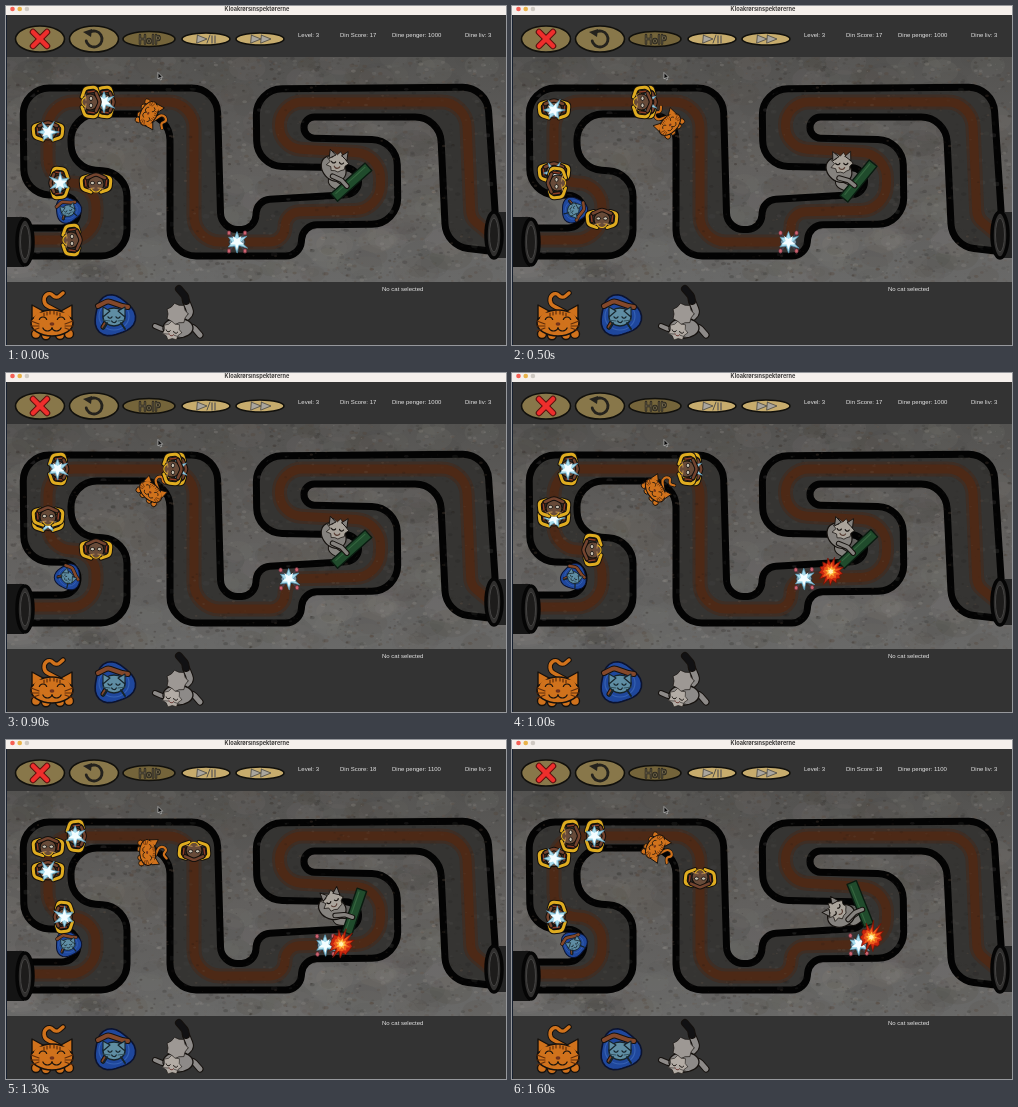
Animation, 500 px wide and 339 px high, one loop 1.7 s. Source, as an HTML page with a canvas:

```html
<!DOCTYPE html>
<html lang="da">
<head>
<meta charset="utf-8">
<title>Kloakrørsinspektørerne</title>
<style>
  html, body { margin: 0; width: 500px; height: 339px; overflow: hidden; background: #333; }
  canvas, svg { position: absolute; left: 0; top: 0; display: block; }
  text { font: 6px "Liberation Sans", Arial, sans-serif; fill: #e4e4e4; }
  .title { font: bold 5.6px Inter, "Liberation Sans", sans-serif; fill: #3b3938; text-anchor: middle; }
</style>
</head>
<body>
<canvas id="stage" width="500" height="339"></canvas>
<svg width="500" height="339">
  <text class="title" x="251" y="5">Kloakrørsinspektørerne</text>
  <text x="292" y="31">Level: 3</text>
  <text x="334" y="31" id="score"></text>
  <text x="386" y="31" id="money"></text>
  <text x="459" y="31">Dine liv: 3</text>
  <text x="376" y="285">No cat selected</text>
</svg>
<script>
const LOOP = 1700, STEP = 100, KILL = 1100, FIRE = 1000;
const FAST = 0.091, SLOW = 0.044; // px per ms
const INK = '#15110e';
const scoreText = document.getElementById('score');
const moneyText = document.getElementById('money');
const front = document.getElementById('stage').getContext('2d');
let c = front;

let seed = 7;
const rnd = () => (seed = (seed * 16807) % 2147483647) / 2147483647;
const pick = list => list[Math.floor(rnd() * list.length)];

// ---------- drawing helpers ----------
function paint(fill, line, width = 1) {
  if (fill) { c.fillStyle = fill; c.fill(); }
  if (line) { c.strokeStyle = line; c.lineWidth = width; c.stroke(); }
}
function oval(x, y, rx, ry, fill, line, width) {
  c.beginPath();
  c.ellipse(x, y, rx, ry, 0, 0, Math.PI * 2);
  paint(fill, line, width);
}
function box(x, y, w, h, fill) {
  c.fillStyle = fill;
  c.fillRect(x, y, w, h);
}
function poly(points, fill, line, width) {
  c.beginPath();
  for (const [x, y] of points) c.lineTo(x, y);
  c.closePath();
  paint(fill, line, width);
}
// Polyline with rounded corners
function bend(points, radius) {
  const gap = (a, b) => Math.hypot(a[0] - b[0], a[1] - b[1]);
  c.beginPath();
  points.forEach((p, i) => {
    const a = points[i - 1], b = points[i + 1];
    if (a && b) c.arcTo(...p, ...b, Math.min(radius, gap(a, p) / 2, gap(p, b) / 2));
    else c.lineTo(...p);
  });
}
function limb(points, color, width) {
  bend(points, width * 2);
  paint(null, INK, width + 2);
  paint(null, color, width);
}
function stroke(x1, y1, x2, y2, color, width) {
  c.beginPath();
  c.moveTo(x1, y1);
  c.lineTo(x2, y2);
  paint(null, color, width);
}
function smile(x, y, r, color = INK, up = 1) {
  c.beginPath();
  c.arc(x, y, r, 0.4, Math.PI - 0.4);
  if (up < 0) { c.beginPath(); c.arc(x, y, r, Math.PI + 0.4, -0.4); }
  paint(null, color, 1.2);
}
function ring(n, radius) {
  return Array.from({ length: n }, (_, i) => {
    const a = i * Math.PI * 2 / n, r = radius(i);
    return [r * Math.cos(a), r * Math.sin(a)];
  });
}
function burst(n, outer, inner, fill, line, wobble = 0) {
  poly(ring(n * 2, i => (i % 2 ? inner : outer) * (1 + wobble * Math.sin(i * 2.7))), fill, line, 0.7);
}
function place(x, y, turn, scale, draw) {
  c.save();
  c.translate(x, y);
  c.rotate(turn);
  c.scale(scale, scale);
  c.lineCap = c.lineJoin = 'round';
  draw();
  c.restore();
}

// ---------- sprites ----------
function orangeCat() {
  const fur = '#d0721c';
  limb([[7, -4], [-14, -15], [-2, -24], [4, -17], [11, -23]], fur, 3.5);
  for (const x of [-16, -6, 8, 17]) oval(x, 20 - Math.abs(x) / 8, 4.5, 4.5, fur, INK, 1.4);
  oval(0, 7, 21, 13, fur, INK, 1.6);
  for (const s of [-1, 1]) {
    poly([[s * 9, -5], [s * 20, -11], [s * 20, 3]], fur, INK, 1.4);
    oval(s * 11, 3, 7, 6.5, fur);
    smile(s * 9, 5, 4, INK, -1);
    for (const k of [0, 1, 2]) {
      stroke(s * 13, 8 + k * 2, s * 21, 5 + k * 5, '#5e2c0b', 1.1);
      stroke(s * (2 + k * 3), -5 + k, s * (2 + k * 3), -2 + k, '#5e2c0b', 1.2);
    }
    smile(s * 4.5, 10, 5);
  }
  oval(0, 8, 2.4, 1.7, '#72331b');
}
function blueCat() {
  poly(ring(30, i => 20 + Math.sin(i * 0.63 + 1) * 1.8), '#1f479c', '#0b1330', 1.6);
  oval(0, 0, 15, 14, null, '#3561b2', 1.2);
  limb([[-16, -10], [-6, -15], [8, -10], [14, -9]], '#84482a', 4);
  limb([[-8, 6], [-11, 11]], '#84482a', 3);
  oval(0, 1, 11, 9, '#5f8da3', '#16242b', 1.3);
  for (const s of [-1, 1]) {
    poly([[s * 4, -5], [s * 11, -9], [s * 11, 1]], '#5f8da3', '#16242b', 1.1);
    stroke(s * 7, 7, s * 11, 13, '#16242b', 2);
    smile(s * 4, 0, 2.2, '#16242b');
    stroke(s * 4, 5, s * 12, 4, '#2e4b59', 0.9);
  }
  smile(0, 4, 2.5, '#16242b');
}
function restingCat() {
  const fur = '#8d8a88';
  limb([[2, 10], [14, -1], [9, -13]], fur, 6);
  limb([[9, -13], [8, -18], [2, -25]], '#111113', 6);
  limb([[6, 13], [16, 13], [23, 21]], fur, 5);
  limb([[-6, 14], [-15, 15], [-22, 12]], fur, 4);
  oval(1, 14, 15, 10, fur, INK, 1.3);
  burst(7, 11, 9, '#9d9894', INK);
  place(-5, 17, 0.2, 0.75, () => {
    burst(7, 13, 10, '#b3aca5', INK);
    for (const s of [-1, 1]) {
      smile(s * 5, -1, 3);
      stroke(s * 4, 5, s * 12, 6, '#474341', 1);
    }
    smile(0, 3, 3.5, '#6b3b35');
  });
}
function gunnerCat() {
  const fur = '#85827e';
  limb([[-8, 8], [-2, 15], [9, 12]], fur, 6);
  oval(-11, 4, 14, 11, fur, INK, 1.2);
  poly([[6, -23], [16, -23], [16, 23], [6, 23]], '#204b2c', '#0a1b10', 1.4);
  stroke(9, -20, 9, 19, '#35653f', 1.2);
  place(-13, -3, -0.7, 1, () => {
    burst(9, 11, 8, '#aaa49b', INK, 0.12);
    for (const s of [-1, 1]) {
      poly([[s * 3, -7], [s * 9, -12], [s * 9, -3]], fur, INK, 0.9);
      smile(s * 4, -1, 2.2);
    }
    smile(0, 3, 3, '#593f35');
  });
  limb([[-6, 10], [3, 6], [11, 6]], fur, 3.5);
}
function iceStar() {
  burst(6, 11, 4.5, '#a9dcec', '#5796b4', 0.12);
  burst(5, 7.5, 3, '#f4fdff');
}
function rat(frozen) {
  for (const s of [-1, 1]) {
    limb([[s * 8, -8], [s * 15, -6], [s * 14, 5], [s * 5, 8]], '#dfac20', 3);
    limb([[s * 4, -7], [s * 11, -7], [s * 10, 2]], '#8b3d26', 1.5);
  }
  oval(0, 0, 8, 8, '#684b39', INK, 1.2);
  limb([[-9, -6], [0, -10], [9, -6]], '#74442f', 2.5);
  if (frozen) return iceStar();
  for (const s of [-1, 1]) {
    oval(s * 3.5, -1, 2.3, 1.6, '#c9c2b2', INK, 0.8);
    stroke(s * 2, 4, s * 7, 5, '#a67c4c', 1.3);
  }
  smile(0, 3, 5, '#dfac20');
}
function paleRat() {
  for (const x of [-9, 9]) for (const y of [-8, 8]) {
    stroke(0, 0, x, y, '#453f48', 1.8);
    oval(x, y, 2.2, 1.8, '#cf6470', '#5a2733', 0.6);
  }
  oval(0, 0, 5, 8, '#8297a3', '#25343c', 1);
  iceStar();
}
function blast(k) {
  burst(13, 14, 9, '#c9260f', '#6d1508', 0.12 + k * 0.2);
  burst(11, 10, 6, '#ee5c1c', null, 0.2);
  burst(8, 6, 3.5, '#ffb53b');
  burst(6, 3.2, 2, '#fff0b0');
}

// ---------- scenery ----------
const upperEdge = [[-9, 222], [70, 222], [74, 190], [18, 188], [17, 82], [211, 82], [215, 224],
  [249, 223], [251, 194], [353, 188], [352, 162], [251, 160], [250, 83], [481, 81], [491, 235], [510, 235]];
const lowerEdge = [[510, 248], [440, 240], [434, 111], [298, 111], [298, 132], [391, 134], [392, 218],
  [297, 219], [294, 250], [164, 250], [164, 108], [64, 108], [66, 163], [121, 166], [121, 250], [-9, 250]];
const route = [[20, 234], [90, 234], [90, 177], [42, 177], [42, 96], [188, 96], [188, 236], [279, 236],
  [279, 206], [374, 204], [375, 148], [274, 142], [273, 96], [460, 96], [465, 212], [490, 233]];

function speckle(n, size, alpha, colors) {
  for (let i = 0; i < n; i++) {
    c.globalAlpha = alpha * rnd();
    const r = size * (0.3 + rnd());
    oval(rnd() * 500, 51 + rnd() * 225, r * 1.5, r, pick(colors));
  }
  c.globalAlpha = 1;
}
function sewer() {
  const floor = c.createLinearGradient(0, 51, 0, 276);
  floor.addColorStop(0, '#535250');
  floor.addColorStop(0.5, '#62605e');
  floor.addColorStop(1, '#696968');
  box(0, 51, 500, 225, floor);
  speckle(450, 12, 0.13, ['#8d8984', '#353432', '#7b766f', '#4a4237']);
  speckle(2600, 1.4, 0.35, ['#8c8984', '#393735', '#544437']);

  bend([...upperEdge, ...lowerEdge], 26);
  c.closePath();
  paint('#353432', '#030303', 7);
  c.save();
  c.clip();
  speckle(1300, 1.8, 0.25, ['#555350', '#222120']);
  c.restore();
  bend(route, 26);
  paint(null, 'rgba(74,38,20,.45)', 15);
  paint(null, '#4d2916', 9);
  speckle(900, 1, 0.3, ['#6c5849', '#241c17']);

  box(0, 211, 18, 50, '#141414');
  box(489, 206, 11, 46, '#242424');
  for (const [x, y] of [[19, 236], [488, 229]]) {
    oval(x, y, 8, 23, '#302f2e', '#050505', 3.5);
    oval(x, y, 4.5, 17, '#1d1c1b', '#454443', 1);
  }
}
function button(x, y, rx, ry, fill) {
  oval(x, y, rx, ry, fill, '#11100c', 1.6);
}
function toolbar() {
  button(34, 33, 24.5, 13, '#88774a');
  for (const [color, width] of [['#5a100e', 6.5], ['#ee2e2c', 4.5]]) {
    stroke(27, 26, 41, 40, color, width);
    stroke(41, 26, 27, 40, color, width);
  }
  button(88, 33, 24.5, 13, '#88774a');
  c.beginPath();
  c.arc(88, 33, 8, -2.1, 2.9);
  paint(null, '#24221d', 2.8);
  poly([[77, 26], [86, 23], [85, 31]], '#24221d');

  button(143, 33, 26, 7.5, '#74643a');
  // Hand-drawn "Help" lettering
  for (const [color, width] of [['#25231d', 2.4], ['#827453', 0.7]]) {
    for (const x of [134, 139, 147, 150]) stroke(x, 29, x, 37.5, color, width);
    stroke(134, 33, 139, 33, color, width);
    for (const [x, y] of [[143, 35], [152, 32]]) {
      oval(x, y, 1.6, 2, null, color, width);
    }
  }
  for (const x of [200, 254]) {
    button(x, 33, 24, 6, '#c7ac6d');
    const arrows = x === 200 ? [x - 9] : [x - 9, x + 1];
    for (const a of arrows) poly([[a, 29], [a + 10, 33], [a, 37]], '#aaa69d', '#545149', 0.9);
  }
  stroke(201, 37, 204, 29, '#545149', 1);
  for (const x of [206, 209]) stroke(x, 30, x, 37, '#686259', 1.4);
}
function scenery() {
  c.lineCap = c.lineJoin = 'round';
  box(0, 0, 500, 339, '#333');
  c.save();
  c.beginPath();
  c.rect(1, 51, 499, 225);
  c.clip();
  sewer();
  c.restore();
  box(0, 0, 500, 9, '#f5f0ec');
  ['#f55f54', '#e9b34a', '#cfc9c2'].forEach((k, i) => oval(6.5 + i * 7.2, 3, 2.3, 2.3, k));
  box(0, 9, 1, 330, '#17202f');
  toolbar();
  place(46, 310, 0, 1, orangeCat);
  place(108, 310, 0, 1, blueCat);
  place(171, 308, 0, 1, restingCat);
}
const backdrop = document.createElement('canvas');
backdrop.width = 500;
backdrop.height = 339;
c = backdrop.getContext('2d');
scenery();
c = front;

// ---------- motion ----------
function along(s) {
  for (let i = 0; ; i++) {
    const [x, y] = route[i], [u, v] = route[i + 1];
    const len = Math.hypot(u - x, v - y);
    if (s <= len) {
      const turn = Math.atan2(v - y, u - x) + Math.PI / 2;
      return { x: x + (u - x) * s / len, y: y + (v - y) * s / len, turn };
    }
    s -= len;
  }
}
// from: distance along the route at the start; ice, thaw: when the rat is slowed
const rats = [
  { from: 45, ice: 1200 },
  { from: 163, ice: 0 },
  { from: 126 },
  { from: 226, ice: 0 },
  { from: 312, ice: 0, thaw: 200, end: KILL },
  { from: 298 },
  { from: 585, pale: true }
];
function locate(r, t) {
  const { ice = Infinity, thaw = Infinity } = r;
  const slow = Math.max(0, Math.min(t, thaw) - ice);
  return { ...r, ...along(r.from + FAST * (t - slow) + SLOW * slow), frozen: t >= ice && t < thaw + 900 };
}
// Turn towards the nearest rat in range, or keep the resting pose
function aim(x, y, list, range, rest) {
  const far = r => Math.hypot(r.x - x, r.y - y);
  const near = list.reduce((a, b) => far(b) < far(a) ? b : a);
  return far(near) < range ? Math.atan2(near.y - y, near.x - x) + Math.PI / 2 : rest;
}

function draw(t) {
  const alive = rats.filter(r => !(t >= r.end)).map(r => locate(r, t));
  c.drawImage(backdrop, 0, 0);

  place(151, 112, aim(151, 112, alive, 45, 2.06), 0.62, () => c.translate(0, 8) || orangeCat());
  place(62, 204, aim(62, 204, alive, 45, 0), 0.63, blueCat);

  for (const r of alive) place(r.x, r.y, r.turn, 1, r.pale ? paleRat : () => rat(r.frozen));

  const prey = alive.find(r => r.pale);
  const swing = Math.min(0.84, Math.atan2(prey.y - 168, prey.x + 6 - 338) - Math.PI / 2);
  place(338, 168, swing, 1, () => {
    gunnerCat();
    if (t >= FIRE) place(9, 35, t / 570, 0.95, () => blast((t - FIRE) / 600));
  });

  poly([[152, 66.5], [152, 73], [153.5, 71.7], [154.6, 74], [155.6, 73.5], [154.6, 71.3], [156.6, 71.2]],
    '#080808', '#d8d8d8', 0.6);
  const won = t >= KILL;
  scoreText.textContent = 'Din Score: ' + (won ? 18 : 17);
  moneyText.textContent = 'Dine penger: ' + (won ? 1100 : 1000);
}

const start = performance.now();
let last = -1;
function tick() {
  const t = Math.floor((performance.now() - start) % LOOP / STEP) * STEP;
  if (t !== last) draw(last = t);
  requestAnimationFrame(tick);
}
tick();
</script>
</body>
</html>
```
